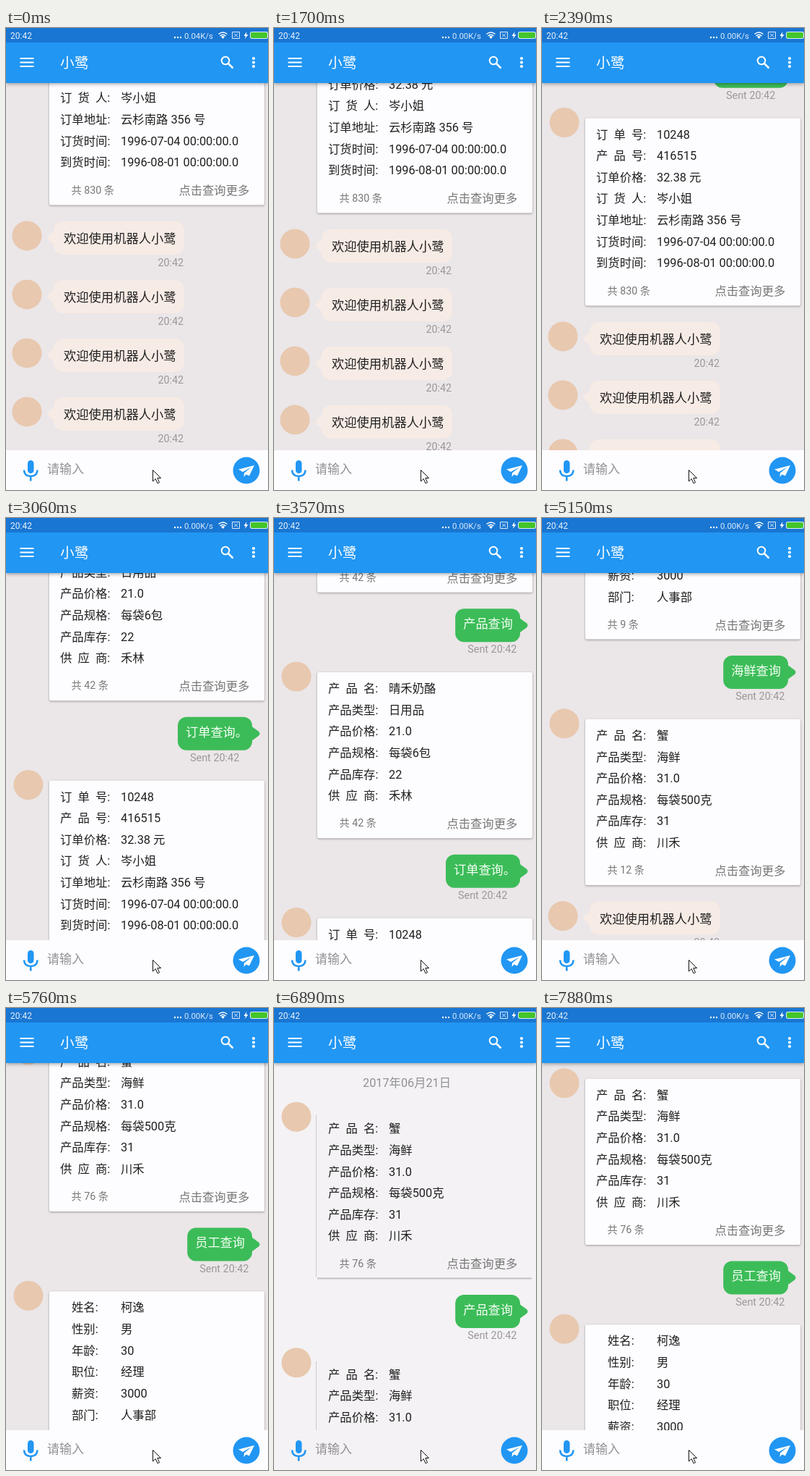
Animation of 363 by 638 pixels, one loop 8 s. Source, as an HTML page with a canvas:

```html
<!DOCTYPE html>
<html lang="zh-CN">
<head>
<meta charset="utf-8">
<title>Chat</title>
<style>
html, body { margin: 0; width: 100%; height: 100%; overflow: hidden; background: #ebe6e8; }
canvas { display: block; }
</style>
</head>
<body>
<canvas id="stage" width="363" height="638"></canvas>
<script>
const ctx = document.getElementById('stage').getContext('2d');
const LOOP = 8000, ROW = 29.65;
const FONT = 'Roboto, "Noto Sans CJK SC", "Noto Sans CJK", sans-serif';
const BLUE = '#2196f3', INK = '#202020', GREY = '#9a979a', WHITE = '#fff';
const BOT = '小鹭';

// [time, step]: the screen updates in discrete steps
const STEPS = [[1700, 0], [2390, 5], [2510, 6], [2660, 7], [2780, 8], [3570, 14],
  [3730, 15], [3880, 16], [4610, 21], [4760, 22], [4900, 23], [5020, 24], [5760, 29],
  [5880, 30], [6010, 31], [6160, 32], [6890, 37], [7050, 38], [7190, 39], [7310, 40], [7880, 44]];
// [step, scroll offset]
const SCROLL = [[-1, 2277], [0, 2266], [5, 2138], [14, 1710], [21, 1156], [29, 432],
  [36, 0], [38, 0], [44, 386]];

const seafood = [['产  品  名:', '蟹'], ['产品类型:', '海鲜'], ['产品价格:', '31.0'],
  ['产品规格:', '每袋500克'], ['产品库存:', '31'], ['供  应  商:', '川禾']];
const cheese = [['产  品  名:', '晴禾奶酪'], ['产品类型:', '日用品'], ['产品价格:', '21.0'],
  ['产品规格:', '每袋6包'], ['产品库存:', '22'], ['供  应  商:', '禾林']];
const staff = [['姓名:', '柯逸'], ['性别:', '男'], ['年龄:', '30'],
  ['职位:', '经理'], ['薪资:', '3000'], ['部门:', '人事部']];
const order = [['订  单  号:', '10248'], ['产  品  号:', '416515'], ['订单价格:', '32.38 元'],
  ['订  货  人:', '岑小姐'], ['订单地址:', '云杉南路 356 号'],
  ['订货时间:', '1996-07-04 00:00:00.0'], ['到货时间:', '1996-08-01 00:00:00.0']];

const feed = [
  { rows: seafood, total: 76 },
  { ask: '产品查询' }, { rows: seafood, total: 76 },
  { ask: '员工查询' }, { rows: staff, total: 9, indent: 16 },
  { ask: '海鲜查询' }, { rows: seafood, total: 12 },
  { hello: true },
  { ask: '产品查询。' }, { rows: cheese, total: 42 },
  { ask: '产品查询' }, { rows: cheese, total: 42 },
  { ask: '订单查询。' }, { rows: order, total: 830 },
  { hello: true }, { hello: true }, { hello: true }, { hello: true }
];

// Give every item its top edge in the scrolled document
let nextTop = 144.2;
for (const item of feed) {
  item.top = nextTop;
  item.height = item.rows ? (item.rows.length - 1) * ROW + 81 : 46;
  nextTop += item.height + (item.rows ? 22.5 : item.ask ? 41.8 : 35);
}

function track(points, x) {
  if (x <= points[0][0]) return points[0][1];
  for (let i = 1; i < points.length; i++) {
    const [x0, y0] = points[i - 1], [x1, y1] = points[i];
    if (x < x1) return y0 + (y1 - y0) * (x - x0) / (x1 - x0);
  }
  return points[points.length - 1][1];
}

function text(s, x, y, size, color, align = 'left') {
  ctx.font = `${size}px ${FONT}`;
  ctx.textAlign = align;
  ctx.fillStyle = color;
  ctx.fillText(s.replace(/ /g, '\u00a0'), x, y + size * 0.37);
}

function rect(x, y, w, h, color, r = 0) {
  ctx.fillStyle = color;
  ctx.beginPath();
  ctx.roundRect(x, y, w, h, r);
  ctx.fill();
}

function disc(x, y, r, color) {
  ctx.fillStyle = color;
  ctx.beginPath();
  ctx.arc(x, y, r, 0, Math.PI * 2);
  ctx.fill();
}

function path(d, color, lineWidth) {
  const p = new Path2D(d);
  if (lineWidth) {
    ctx.strokeStyle = color;
    ctx.lineWidth = lineWidth;
    ctx.stroke(p);
  } else {
    ctx.fillStyle = color;
    ctx.fill(p);
  }
}

function withShadow(blur, dy, draw) {
  ctx.save();
  ctx.shadowColor = 'rgba(0,0,0,.35)';
  ctx.shadowBlur = blur;
  ctx.shadowOffsetY = dy;
  draw();
  ctx.restore();
}

function avatar(x, y) {
  disc(x, y, 20.5, '#e8c8ae');
}

function drawCard({ rows, total, indent = 0, height }, top, pale) {
  avatar(31, top + 6);
  if (pale) {
    path(`M58.5 ${top + 4}V${top + height - 2}`, '#cbc8cb', 1);
    path(`M60 ${top + height}H357`, '#c4c1c4', 2);
  } else {
    withShadow(3, 1, () => rect(60, top, 298, height, '#fdfcfe', 2));
  }
  rows.forEach(([label, value], i) => {
    const y = top + 22 + i * ROW;
    text(label, 75 + indent, y, 16.35, INK);
    text(value, 159, y, 16.35, INK);
  });
  const foot = top + height - 21;
  text(`共 ${total} 条`, 90.5, foot, 14.2, '#777');
  text('点击查询更多', 239.5, foot + 1, 16.3, '#777');
}

function drawAsk({ ask }, top) {
  const left = 341 - ask.length * 17.2 - (ask.length > 4 ? 17 : 21);
  rect(left, top, 341 - left, 46, '#3cbc58', 12);
  path(`M339 ${top + 12}L350 ${top + 20}Q353 ${top + 23} 350 ${top + 26}L339 ${top + 34}Z`, '#3cbc58');
  text(ask, left + 11, top + 20.5, 17.2, '#f4fff5');
  text('Sent 20:42', left + 17, top + 56, 14.4, GREY);
}

function drawHello(top, pale) {
  avatar(29, top + 20);
  if (!pale) {
    rect(66, top, 181, 46, '#f7ebe5', 13);
    path(`M68 ${top + 12}L59 ${top + 20}Q56 ${top + 23} 59 ${top + 26}L68 ${top + 34}Z`, '#f7ebe5');
  }
  text('欢迎使用机器人' + BOT, 80, top + 23.5, 17.3, INK);
  text('20:42', 246, top + 56.5, 14.3, GREY, 'right');
}

function drawFeed(scroll, pale) {
  text('2017年06月21日', 123, 103 - scroll, 16.3, '#919092');
  for (const item of feed) {
    const top = item.top - scroll;
    if (top > 600 || top + item.height < 0) continue;
    if (item.rows) drawCard(item, top, pale);
    else if (item.ask) drawAsk(item, top);
    else drawHello(top, pale);
  }
}

function drawStatus(speed) {
  rect(0, 0, 363, 20, '#1976d2');
  text('20:42', 6, 10.5, 12, '#e8f2fc');
  for (const x of [234, 238, 242]) disc(x, 13, 1.2, WHITE);
  text(speed, 247, 10.5, 11.4, '#dcebfa');
  path('M294.5 8.5Q300.5 3.5 306.5 8.5M296.5 11Q300.5 7.5 304.5 11', WHITE, 1.3);
  path('M298 12Q300.5 10 303 12L300.5 15Z', WHITE);
  path('M313.5 5.5H323.5V14.5H313.5ZM316 7.5L321 12.5M321 7.5L316 12.5', '#dcebfa', 1);
  path('M333.5 5L329.5 11H332L331 15L335.5 9H332.8Z', WHITE);
  rect(338, 5, 25, 10, '#dcebfa', 3);
  rect(339, 6, 23, 8, '#43c52b', 2);
}

function drawHeader() {
  withShadow(5, 1.5, () => rect(0, 20, 363, 56, BLUE));
  for (const y of [42, 47.5, 53]) {
    rect(19.5, y - 1, 19, 2, WHITE);
    disc(343, y, 2.1, WHITE);
  }
  text(BOT, 75, 48, 19.7, WHITE);
  ctx.beginPath();
  ctx.arc(304, 45, 5.3, 0, Math.PI * 2);
  ctx.strokeStyle = WHITE;
  ctx.lineWidth = 2;
  ctx.stroke();
  path('M308 49L314.5 55.5', WHITE, 2.5);
}

function drawInput(color) {
  rect(0, 583, 363, 55, color);
  rect(30, 597, 8.5, 18, BLUE, 4.25);
  path('M25 610.5Q25.5 619 34.25 619T43.5 610.5M34.25 619V625.5', BLUE, 2.6);
  text('请输入', 57, 609, 17, '#929094');
  disc(333, 611, 18.5, BLUE);
  path('M344 604L322 609.5L328 613L340 606.5L330 614.5L329.5 620L332.5 616.5L337 618.5Z', WHITE);
}

function drawPointer() {
  const arrow = 'M203.5 610.5V626L207.2 622.5L210 628.8L212.5 627.6L209.8 621.5H214.5Z';
  path(arrow, WHITE);
  path(arrow, '#111', 1);
}

function render(time) {
  const step = time < STEPS[0][0] ? -1 : Math.floor(track(STEPS, time) + 1e-6);
  const pale = (step >= 19 && step < 24) || (step >= 35 && step < 40);
  const back = pale ? '#f4f2f4' : '#ebe6e8';
  rect(0, 0, 363, 638, back);
  drawFeed(Math.round(track(SCROLL, step)), pale);
  drawHeader();
  drawStatus(time < 840 ? '0.04K/s' : '0.00K/s');
  drawInput(pale ? back : '#fdfcfe');
  drawPointer();
}

function tick() {
  render(performance.now() % LOOP);
  requestAnimationFrame(tick);
}
tick();
</script>
</body>
</html>
```
